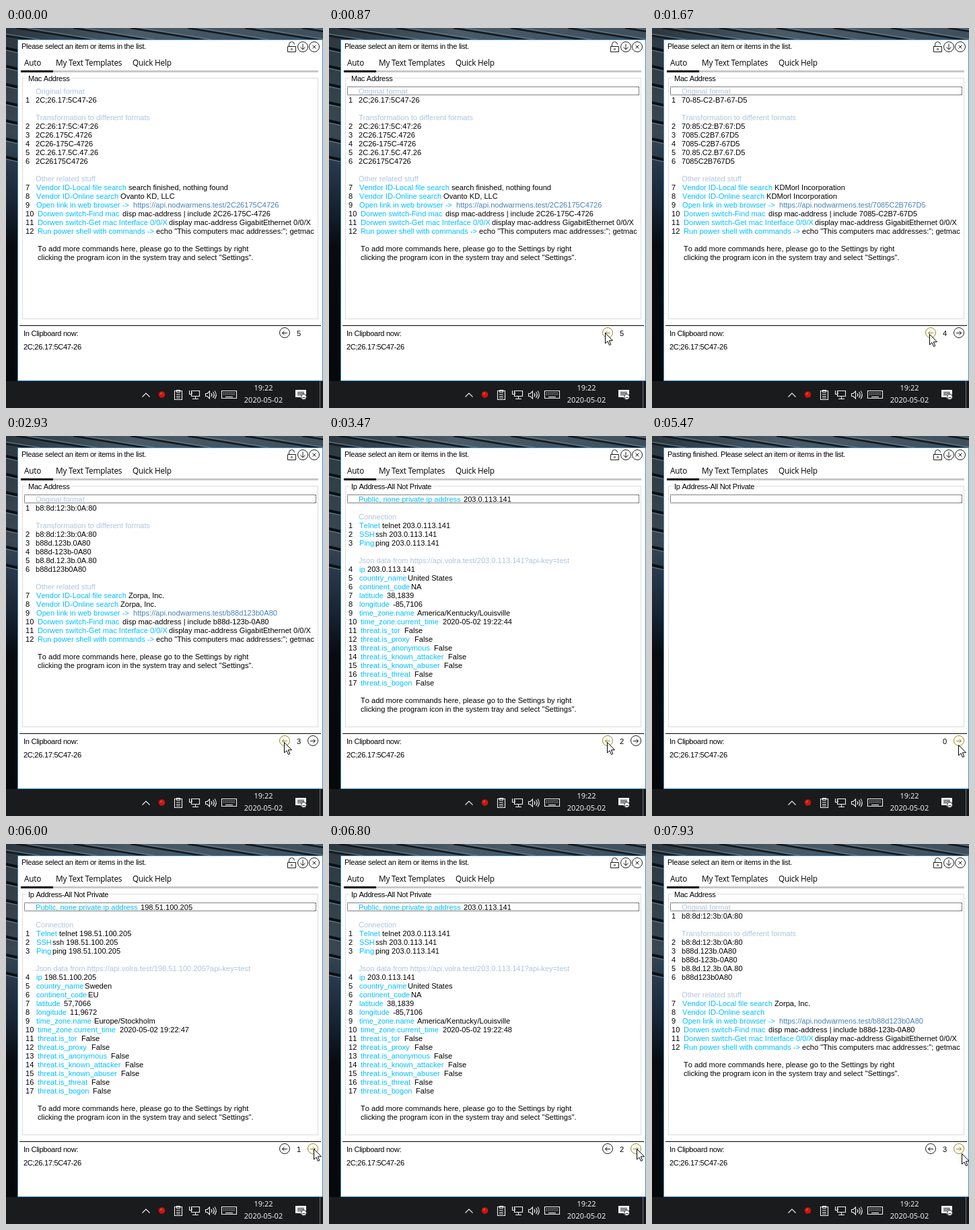
An HTML page for the animation above (8000 ms loop, 471 by 565 pixels).

```html
<!DOCTYPE html>
<html lang="en">
<head>
<meta charset="utf-8">
<title>Clipboard helper</title>
<style>
html, body { margin: 0; width: 100%; height: 100%; overflow: hidden; background: #0d1216; }
svg { display: block; width: 100vw; height: 100vh; }
text { font: 11.1px "Liberation Sans", Arial, sans-serif; font-kerning: none; white-space: pre; }
.label { letter-spacing: -.3px; }
.tab { font: 11.8px "Open Sans", "Noto Sans", sans-serif; letter-spacing: -.2px; }
.clock { font: 11px "Open Sans", "Noto Sans", sans-serif; fill: #fff; text-anchor: middle; }
.line { fill: none; stroke: #1c1c1c; }
.tray { fill: none; stroke: #f2f2f2; stroke-width: 1.1; }
</style>
</head>
<body>
<svg viewBox="0 0 471 565">
  <defs>
    <linearGradient id="side" x2="0" y2="1">
      <stop offset="0" stop-color="#2c3840"/>
      <stop offset=".3" stop-color="#3a4750"/>
      <stop offset=".38" stop-color="#28394b"/>
      <stop offset=".5" stop-color="#172433"/>
      <stop offset=".62" stop-color="#080b0f"/>
      <stop offset="1" stop-color="#06080a"/>
    </linearGradient>
    <linearGradient id="top">
      <stop offset="0" stop-color="#2b363e"/>
      <stop offset=".4" stop-color="#4a5a66"/>
      <stop offset="1" stop-color="#3f4f5b"/>
    </linearGradient>
  </defs>

  <path d="M0 0H18V525H0Z" fill="url(#side)"/>
  <path d="M0 0H471V18H0Z" fill="url(#top)"/>
  <g id="planks" fill="none"></g>

  <!-- window -->
  <path d="M17.5 17.5H470.5V524.5H17.5Z" fill="#fff" stroke="#3f8cc9"/>
  <text class="label" id="status" x="23" y="31"></text>
  <g class="line">
    <path d="M418.5 27.5H430.5V35.5H418.5ZM420.5 27.5V24.5A4 4 0 0 1 428.5 24.5"/>
    <circle cx="424.5" cy="31.5" r="1"/>
    <circle cx="441" cy="28" r="7.5"/>
    <path d="M441 23.5V32M437.5 28.5L441 32L444.5 28.5"/>
    <circle cx="458" cy="28" r="7.5"/>
    <path d="M455.5 25.5L460.5 30.5M460.5 25.5L455.5 30.5"/>
  </g>
  <text class="tab" x="27" y="56">Auto</text>
  <text class="tab" x="74" y="56">My Text Templates</text>
  <text class="tab" x="188" y="56">Quick Help</text>
  <path d="M70 63H464V66H70Z" fill="#c8c8c8"/>
  <path d="M22 63H70V66H22Z"/>
  <path d="M24.5 74.5H463.5V432.5H24.5Z" fill="none" stroke="#dcdcdc"/>
  <g id="page"></g>
  <path id="focus" d="M27.5 87.5H460.5V99.5H27.5Z" fill="none" stroke="#000"
    stroke-dasharray="1" stroke-dashoffset=".5"/>
  <path d="M20 442H468V443H20Z"/>
  <text class="label" x="26" y="458">In Clipboard now:</text>
  <text class="label" x="26" y="478">2C;26.17:5C47-26</text>
  <text id="count" x="432" y="458"></text>
  <g id="back" class="line">
    <circle cx="414" cy="453" r="7.5"/>
    <path d="M418 453.5H410.5M413.5 450.5L410.5 453.5L413.5 456.5"/>
  </g>
  <g id="next" class="line">
    <circle cx="456" cy="453" r="7.5"/>
    <path d="M452 453.5H459.5M456.5 450.5L459.5 453.5L456.5 456.5"/>
  </g>

  <!-- taskbar -->
  <path d="M0 525H471V565H0Z" fill="#191b1d"/>
  <circle cx="231.5" cy="545" r="4.8" fill="#c9150f"/>
  <circle cx="230.5" cy="543.5" r="1.5" fill="#e8473c"/>
  <g class="tray">
    <path d="M202.5 548.5L208 543L213.5 548.5"/>
    <path d="M250.5 539.5H261.5V552.5H250.5ZM253.5 538.5H258.5V541.5H253.5ZM253 544.5H259M253 547.5H259M253 550H259"/>
    <path d="M275.5 539.5H287.5V547.5H275.5ZM281.5 547.5V551.5M277 551.5H286M272.5 539V544.5H276V541"/>
    <path d="M296.5 543.5H299L302.5 540V551L299 547.5H296.5ZM305 543Q307 545.5 305 548M307.5 541Q311 545.5 307.5 550M310 539.5Q314.5 545.5 310 551.5"/>
    <path d="M320.5 539.5H342.5V550.5H320.5Z"/>
    <path d="M323 542.5H341M323 545H341" stroke-dasharray="1.5"/>
    <path d="M326 548.5H337"/>
  </g>
  <text class="clock" x="382.5" y="539">19:22</text>
  <text class="clock" x="382.5" y="557">2020-05-02</text>
  <path d="M430 538H446V549H441V553L437 549H430Z" fill="#fff"/>
  <path d="M433 541.5H443M433 543.5H443M433 545.5H439" stroke="#222"/>
  <circle cx="442.5" cy="548.5" r="4" fill="#fff" stroke="#1b1d1f"/>
  <path d="M440.5 549.5H444.5" stroke="#222"/>
  <path d="M466.5 525V565" stroke="#70757a"/>

  <path id="cursor" d="M.5 .5V16L4 12.8L6.5 18.5L8.8 17.5L6.3 11.8H11.5Z" fill="#fff" stroke="#000"/>
</svg>
<script>
const $ = id => document.getElementById(id);
const HEAD = '#b0c4de', KEY = '#00bfff', LINK = '#4682b4';

// tick, page, tick of first results, tick of last results
const visits = [
  [0, 5, 0, 0], [17, 4, 19, 25], [31, 3, 33, 35], [48, 2, 49, 52], [62, 1, 63, 65],
  [75, 0], [87, 1, 88, 90], [100, 2, 101, 102], [112, 3, 116, 999]
];
// tick, x, y of the pointer
const path = [
  [0, 472, 570], [1, 463, 556], [5, 438, 491], [8, 416, 459], [10, 410, 453], [18, 410, 453],
  [21, 412, 455], [36, 412, 455], [38, 412, 463], [40, 412, 463], [44, 413, 455], [77, 413, 455],
  [82, 455, 459], [86, 455, 459], [90, 457, 453], [111, 457, 453], [116, 458, 461],
  [117, 458, 461], [119, 460, 460]
];
const macs = {
  5: ['2C;26.17:5C47-26', 'search finished, nothing found', 'Ovanto KD, LLC'],
  4: ['70-85-C2-B7-67-D5', 'KDMorl Incorporation', 'KDMorl Incorporation'],
  3: ['b8:8d:12:3b:0A:80', 'Zorpa, Inc.', 'Zorpa, Inc.']
};
const hosts = {
  2: ['203.0.113.141', 'United States', 'NA', '38,1839', '-85,7106', 'America/Kentucky/Louisville'],
  1: ['198.51.100.205', 'Sweden', 'EU', '57,7066', '11,9672', 'Europe/Stockholm']
};

const rowY = row => 98 + 13 * row;
const text = (x, row, str, color = '#000') =>
  `<text x="${x}" y="${rowY(row)}" fill="${color}">${str}</text>`;
const item = (row, n, key, x, value, color) =>
  text(29, row, n) + text(n > 9 ? 47 : 45, row, key, KEY) + text(x, row, value, color);
const title = (str, width) =>
  `<path d="M31 73H${31 + width}V77H31Z" fill="#fff"/><text class="label" x="33" y="79">${str}</text>`;
const footer = row =>
  text(47, row, 'To add more commands here, please go to the Settings by right') +
  text(47, row + 1, 'clicking the program icon in the system tray and select "Settings".');

function macPage(page, local, online) {
  const [raw, found, vendor] = macs[page];
  const hex = raw.replace(/\W/g, '');
  const split = (size, mark) => hex.match(new RegExp(`.{${size}}`, 'g')).join(mark);
  const forms = [split(2, ':'), split(4, '.'), split(4, '-'), split(2, '.'), hex];
  return title('Mac Address', 66) +
    text(44, 0, 'Original format', HEAD) + text(29, 1, 1) + text(44, 1, raw) +
    text(44, 3, 'Transformation to different formats', HEAD) +
    forms.map((form, i) => text(29, 4 + i, 2 + i) + text(44, 4 + i, form)).join('') +
    text(44, 10, 'Other related stuff', HEAD) +
    item(11, 7, 'Vendor ID-Local file search', 182, local ? found : '') +
    item(12, 8, 'Vendor ID-Online search', 170, online ? vendor : '') +
    item(13, 9, 'Open link in web browser ->', 189, 'https://api.nodwarmens.test/' + hex, LINK) +
    item(14, 10, 'Dorwen switch-Find mac', 173, 'disp mac-address | include ' + split(4, '-')) +
    item(15, 11, 'Dorwen switch-Get mac Interface 0/0/X', 242, 'display mac-address GigabitEthernet 0/0/X') +
    item(16, 12, 'Run power shell with commands ->', 223, 'echo "This computers mac addresses:"; getmac') +
    footer(18);
}

function hostPage(page, start, shown) {
  const [ip, country, continent, lat, lon, zone] = hosts[page];
  const second = Math.floor(41.6 + start / 15);
  const data = [
    ['ip', 57, ip], ['country_name', 117, country], ['continent_code', 122, continent],
    ['latitude', 86, lat], ['longitude', 95, lon], ['time_zone.name', 131, zone],
    ['time_zone.current_time', 169, '2020-05-02 19:22:' + second],
    ...[['tor', 112], ['proxy', 127], ['anonymous', 156], ['known_attacker', 177],
      ['known_abuser', 171], ['threat', 127], ['bogon', 129]]
      .map(([name, x]) => ['threat.is_' + name, x, 'False'])
  ];
  return title('Ip Address-All Not Private', 124) +
    text(44, 0, 'Public, none private ip address', KEY) + text(200, 0, ip) +
    text(44, 2, 'Connection', HEAD) +
    item(3, 1, 'Telnet', 79, 'telnet ' + ip) +
    item(4, 2, 'SSH', 69, 'ssh ' + ip) +
    item(5, 3, 'Ping', 69, 'ping ' + ip) +
    text(44, 7, `Json data from https://api.volra.test/${ip}?api-key=test`, HEAD) +
    data.map(([key, x, value], i) =>
      item(8 + i, 4 + i, key, x, i < shown * data.length ? value : '')).join('') +
    footer(23);
}

function pointer(tick) {
  const i = path.findIndex(p => p[0] >= tick);
  if (i < 1) return path[0].slice(1);
  const [t0, x0, y0] = path[i - 1], [t1, x1, y1] = path[i];
  const k = (tick - t0) / (t1 - t0);
  return [Math.round(x0 + (x1 - x0) * k), Math.round(y0 + (y1 - y0) * k)];
}

function button(id, cx, visible, [x, y]) {
  const hover = Math.hypot(x - cx, y - 453) < 9;
  $(id).style.display = visible ? '' : 'none';
  $(id).style.stroke = hover ? '#968c1e' : '#1c1c1c';
}

function draw(tick) {
  const [start, page, first, last] = visits.filter(v => v[0] <= tick).pop();
  $('page').innerHTML =
    page > 2 ? macPage(page, tick >= first, tick >= last) :
    page ? hostPage(page, start, Math.min(1, (tick - start) / (last - start))) :
    title('Ip Address-All Not Private', 124);
  $('status').textContent = (page ? '' : 'Pasting finished. ') + 'Please select an item or items in the list.';
  $('count').textContent = page;
  $('focus').style.display = tick < 13 ? 'none' : '';
  const at = pointer(tick);
  button('back', 414, page > 0, at);
  button('next', 456, page < 5, at);
  $('cursor').setAttribute('transform', `translate(${at})`);
}

// wooden planks behind the window
let planks = '';
for (let i = 0; i < 7; i++) {
  const y = 30 + i * 27, x = i * 85 - 70;
  planks += `<path d="M0 ${y}l18 4" stroke="#0b1014" stroke-width="4"/>` +
    `<path d="M0 ${y + 3}l18 4" stroke="#71828c"/>` +
    `<path d="M${x} 0l110 18" stroke="#12191e" stroke-width="2.5"/>` +
    `<path d="M${x + 16} 0l110 18" stroke="#6d7f8a"/>`;
}
$('planks').innerHTML = planks;

let drawn = -1;
function loop() {
  const tick = Math.floor((performance.now() % 8000 + 5) * .015) % 120;
  if (tick !== drawn) draw(drawn = tick);
  requestAnimationFrame(loop);
}
loop();
</script>
</body>
</html>
```
